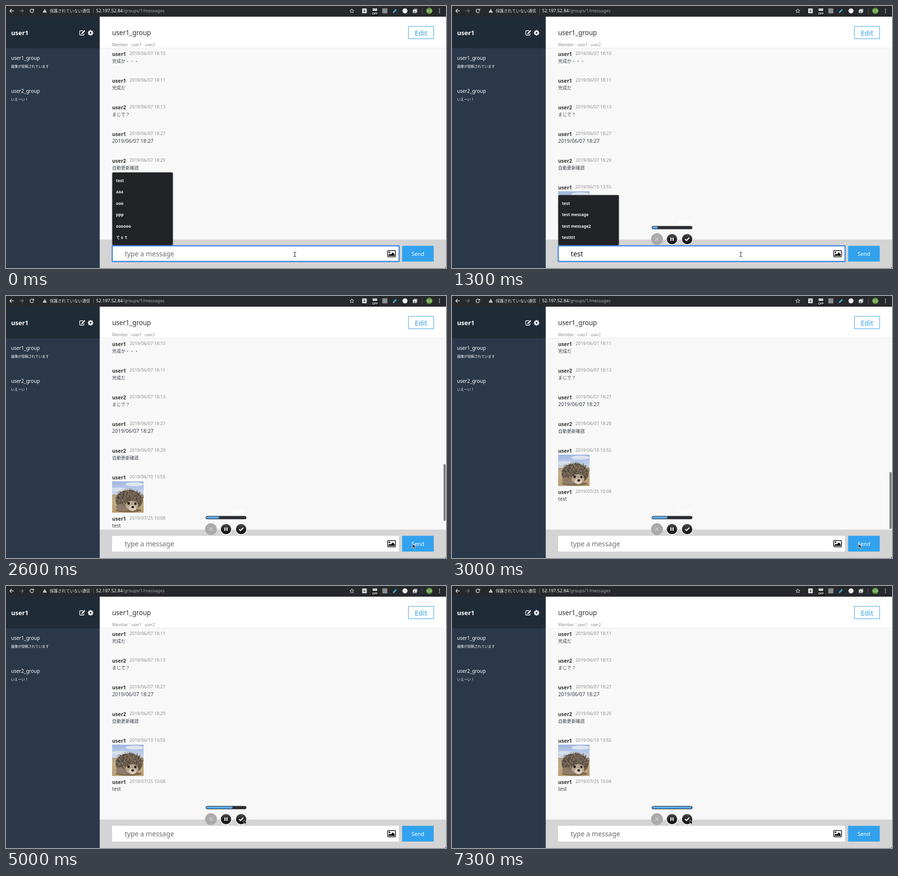
These frames come from a looping animation (908x540 px, 7400 ms). An HTML page with a canvas:

```html
<!DOCTYPE html>
<html lang="ja">
<head>
<meta charset="utf-8">
<title>Group chat</title>
<style>
html, body { margin: 0; width: 100%; height: 100%; overflow: hidden; background: #f8f8f8; }
canvas { display: block; width: 908px; height: 540px; }
</style>
</head>
<body>
<canvas id="stage" width="908" height="540"></canvas>
<script>
const c = document.getElementById('stage').getContext('2d');
const LOOP = 7400, STEP = 100;
const LATIN = '"Noto Sans", "Noto Sans CJK JP", sans-serif';
const JP = '"Noto Sans CJK JP", "Noto Sans", sans-serif';
const USERS = ['user1', 'user2'];

const messages = [
  { who: 0, date: '2019/06/07 18:10', body: '完成か・・・' },
  { who: 0, date: '2019/06/07 18:11', body: '完成だ' },
  { who: 1, date: '2019/06/07 18:13', body: 'まじで？' },
  { who: 0, date: '2019/06/07 18:27', body: '2019/06/07 18:27', latin: true },
  { who: 1, date: '2019/06/07 18:29', body: '自動更新確認' },
  { who: 0, date: '2019/06/10 13:55', photo: true },
  { who: 0, date: '2019/07/25 10:08', body: 'test', latin: true, sent: true }
];

// timeline, ms
const CONTROLS = 300, CLICK = 2500, POSTED = 2600, SCROLLED = 2900;
const keys = [[300, 't'], [500, 'te'], [600, 'tes'], [700, 'test']];
const suggestions = [
  [0, ['test', 'aaa', 'ooo', 'ppp', 'oooooo', 'てｓｔ']],
  [400, ['test', 'teeeeest', 'teeest', 'test message', 'test message2', 'testttt']],
  [700, ['test', 'test message', 'test message2', 'testttt']]
];
const pointerPath = [
  [0, 596, 512], [1300, 596, 512], [2100, 839, 511], [3600, 839, 511],
  [4100, 772, 486], [5000, 491, 482], [7400, 491, 482]
];

const clamp = v => Math.max(0, Math.min(1, v));
const ease = v => v * v * (3 - 2 * v);

function latest(list, t) {
  let value = null;
  for (const [start, v] of list) if (t >= start) value = v;
  return value;
}

function rect(x, y, w, h, color) {
  c.fillStyle = color;
  c.fillRect(x, y, w, h);
}

function round(x, y, w, h, r, fill, stroke, width = 1) {
  c.beginPath();
  c.roundRect(x, y, w, h, r);
  paint(fill, stroke, width);
}

function paint(fill, stroke, width = 1) {
  if (fill) { c.fillStyle = fill; c.fill(); }
  if (stroke) { c.strokeStyle = stroke; c.lineWidth = width; c.stroke(); }
}

function ellipse(x, y, rx, ry, fill, stroke, width) {
  c.beginPath();
  c.ellipse(x, y, rx, ry, 0, 0, Math.PI * 2);
  paint(fill, stroke, width);
}

function shape(points, fill, stroke, width, open) {
  c.beginPath();
  points.forEach(([x, y]) => c.lineTo(x, y));
  if (!open) c.closePath();
  paint(fill, stroke, width);
}

const line = (points, color, width) => shape(points, null, color, width, true);

function text(s, x, y, size, color, { weight = 400, font = LATIN, align = 'left' } = {}) {
  c.font = `${weight} ${size}px ${font}`;
  c.textAlign = align;
  c.fillStyle = color;
  c.fillText(s, x, y);
}

function browserBar() {
  const light = '#e9e9ea';
  rect(0, 0, 908, 22, '#27282c');
  line([[16, 10], [8, 10]], light, 1.3);
  line([[11.5, 6.3], [8, 10], [11.5, 13.7]], light, 1.3);
  line([[28, 10], [36, 10]], '#77787b', 1.2);
  line([[32.5, 6.3], [36, 10], [32.5, 13.7]], '#77787b', 1.2);
  c.beginPath();
  c.arc(53.3, 10, 3.7, 0.3, Math.PI * 1.75);
  paint(null, light, 1.3);
  shape([[57.8, 5.5], [57.8, 9.2], [54, 9.2]], light);
  shape([[80, 6], [84.2, 13.5], [75.8, 13.5]], light);
  rect(79.6, 8.6, 0.9, 2.5, '#27282c');
  rect(79.6, 11.8, 0.9, 0.9, '#27282c');
  text('保護されていない通信', 90, 13.2, 8.4, '#e4e4e6', { font: JP });
  rect(180, 5, 1, 11, '#606166');
  text('52.197.52.84', 186, 13.3, 9.2, '#ffffff');
  text('/groups/1/messages', 241, 13.3, 8.9, '#a5a6aa');

  const star = [];
  for (let i = 0; i < 10; i++) {
    const a = i * Math.PI / 5 - Math.PI / 2, r = i % 2 ? 2 : 4.6;
    star.push([713.7 + Math.cos(a) * r, 10.3 + Math.sin(a) * r]);
  }
  shape(star, null, light, 0.9);
  round(735, 5, 9.5, 10, 1, '#d9dadb');
  line([[739.7, 7], [739.7, 12.5]], '#5d5f63', 1.2);
  shape([[737.3, 10], [742.1, 10], [739.7, 13]], '#5d5f63');
  rect(756.5, 5, 9.5, 6, '#c9cacc');
  round(754.5, 10.5, 13.5, 9, 1.5, '#050505');
  text('OFF', 761.2, 17.8, 6.3, '#ffffff', { weight: 600, align: 'center' });
  round(776.5, 4.7, 10.5, 10.5, 1, '#8b8c8f');
  line([[799.7, 13], [805.5, 7.2]], '#35a7c2', 3.2);
  line([[798.8, 14], [800, 12.8]], '#d8edf2', 1.2);
  ellipse(823.4, 10, 5.2, 5.2, '#eeeeee');
  round(841.5, 5.5, 7.5, 7, 1, '#8d8e92');
  round(839.5, 7.5, 8, 7, 1, '#e2e2e3');
  shape([[840.5, 13.5], [843, 10.2], [846.3, 13.5]], '#77787b');
  rect(858.5, 4, 1, 12, '#55565a');
  ellipse(873.5, 10, 6.5, 6.5, '#5d963b');
  text('会員', 873.5, 12.3, 5.5, '#dceacf', { font: JP, align: 'center' });
  for (const y of [6.4, 10, 13.6]) ellipse(894.5, y, 1, 1, light);
}

function sidebar() {
  rect(0, 22, 193.4, 65, '#202b38');
  rect(0, 87, 193.4, 453, '#2a384a');
  text(USERS[0], 10.5, 60, 13, '#ffffff', { weight: 700 });

  c.beginPath();
  c.moveTo(159, 51);
  c.lineTo(153.5, 51);
  c.quadraticCurveTo(152, 51, 152, 52.5);
  c.lineTo(152, 58.5);
  c.quadraticCurveTo(152, 60, 153.5, 60);
  c.lineTo(159.5, 60);
  c.quadraticCurveTo(161, 60, 161, 58.5);
  c.lineTo(161, 56.5);
  paint(null, '#ffffff', 1.3);
  line([[156.8, 56.5], [162.6, 50.7]], '#ffffff', 2.5);
  shape([[155.2, 58], [155.8, 55.4], [157.8, 57.4]], '#ffffff');

  for (let i = 0; i < 4; i++) {
    const a = i * Math.PI / 4, dx = Math.cos(a) * 5.6, dy = Math.sin(a) * 5.6;
    line([[174.5 - dx, 55.3 - dy], [174.5 + dx, 55.3 + dy]], '#ffffff', 2.5);
  }
  ellipse(174.5, 55.3, 4.3, 4.3, '#ffffff');
  ellipse(174.5, 55.3, 1.8, 1.8, '#202b38');

  ['画像が投稿されています', 'いえーい！'].forEach((note, i) => {
    text(USERS[i] + '_group', 10.5, 111 + i * 68, 10, '#ffffff', { weight: 500 });
    text(note, 10.5, 126.5 + i * 68, 7.1, '#ffffff', { font: JP, weight: 500 });
  });
}

function header() {
  rect(193, 22, 715, 65, '#ffffff');
  rect(193, 86, 715, 1, '#ececec');
  text(USERS[0] + '_group', 219, 60, 13.5, '#2c2c2c');
  text('Member：', 219, 83, 8.2, '#8c8c8c');
  text(USERS[0], 259, 83, 8, '#8c8c8c');
  text(USERS[1], 286, 83, 8, '#8c8c8c');
  round(830.4, 42, 52.2, 25.5, 0, null, '#3a9fe0');
  text('Edit', 856.5, 60.5, 14.5, '#36a0e4', { align: 'center' });
}

function photo(x, y) {
  let seed = 7;
  const rnd = () => (seed = (seed * 16807) % 2147483647) / 2147483647;
  c.save();
  c.translate(x, y);
  c.beginPath();
  c.rect(0, 0, 65, 64.5);
  c.clip();
  const sky = c.createLinearGradient(0, 0, 0, 32);
  sky.addColorStop(0, '#9fb6e0');
  sky.addColorStop(0.6, '#c0cfe8');
  sky.addColorStop(1, '#dbe0e6');
  rect(0, 0, 65, 32, sky);
  ellipse(46, 6, 19, 4, '#dfe5f1');
  ellipse(14, 17, 18, 4, '#d8dfec');
  const sand = c.createLinearGradient(0, 26, 0, 65);
  sand.addColorStop(0, '#a89f84');
  sand.addColorStop(0.35, '#c4ae86');
  sand.addColorStop(1, '#b69b70');
  rect(0, 27, 65, 38, sand);
  ellipse(34, 60, 27, 4, '#806c51');
  ellipse(35, 39, 28, 21, '#66584a');
  ellipse(24, 53, 16, 8, '#8f7c68');
  for (let i = 0; i < 330; i++) {
    const a = rnd() * Math.PI * 2, r = Math.sqrt(rnd());
    const px = 35 + Math.cos(a) * r * 28, py = 35 + Math.sin(a) * r * 18;
    line([[px, py], [px + (px - 38) * 0.08, py - 2.5]], i % 2 ? '#3d3229' : '#a3937f', 0.8);
  }
  ellipse(41, 50, 13, 10, '#b8a48e');
  ellipse(42, 55, 8, 6, '#dccdbb');
  ellipse(34, 45.5, 2.5, 2.8, '#1d1815');
  ellipse(48, 46, 2.3, 2.6, '#1d1815');
  ellipse(42.5, 53, 3, 2.5, '#2b211e');
  c.restore();
}

function messageList(t) {
  const scroll = 55 * ease(clamp((t - POSTED) / (SCROLLED - POSTED)));
  c.save();
  c.beginPath();
  c.rect(193, 87, 715, 394.5);
  c.clip();
  let y = 99 - scroll;
  for (const m of messages) {
    if (!m.sent || t >= POSTED) {
      text(USERS[m.who], 219, y + 4, 10.4, '#333333', { weight: 700 });
      text(m.date, 255, y + 1.5, 9.1, '#8f8f8f');
      if (m.photo) photo(219, y + 8);
      else if (m.latin) text(m.body, 219, y + 18, m.sent ? 10.2 : 10.5, '#3b414a');
      else text(m.body, 219, y + 17.5, 9.15, '#3b414a', { font: JP });
    }
    y += m.photo ? 85 : 55;
  }
  c.restore();
  if (t >= POSTED) {
    c.globalAlpha = 1 - clamp((t - 3500) / 300);
    round(902.8, 363 - (55 - scroll) * 0.3, 4.6, 117, 2.3, '#7e7e7e');
    c.globalAlpha = 1;
  }
}

function form(t) {
  const focused = t < CLICK, typed = latest(keys, t);
  rect(193, 481.5, 715, 58.5, '#d4d4d4');
  rect(219, 494.3, 592, 32.4, '#ffffff');
  if (focused) round(219.2, 494.2, 592, 32.4, 1, null, '#4a8be6', 2.6);
  if (typed && t < POSTED) {
    text(typed, 245, 516, 14.4, '#111111');
    const sinceKey = t - 700;
    if (focused && (sinceKey < 0 || sinceKey % 1000 < 500)) {
      rect(245 + c.measureText(typed).width, 503, 1, 15, '#111111');
    }
  } else {
    text('type a message', 245, 516, 13.9, '#6c6c6c');
  }
  round(787.7, 504, 16, 13, 1.5, null, '#111111', 1.5);
  ellipse(791.5, 507.7, 1.6, 1.6, '#111111');
  shape([[789.5, 515], [789.5, 513], [792, 510.5], [794, 512.3],
    [798.2, 507.7], [802, 511.5], [802, 515]], '#111111');
  rect(817.4, 494.3, 65.3, 32.4, '#32a2ee');
  text('Send', 850, 514.7, 11.2, '#ffffff', { align: 'center' });
}

function dropdown(t) {
  if (t >= CLICK) return;
  const items = latest(suggestions, t), step = 23.4;
  const h = items.length * step + 9.6, top = 493 - h;
  c.save();
  c.shadowColor = 'rgba(0,0,0,.3)';
  c.shadowBlur = 3;
  round(219.3, top, 125, h, 2, '#222327');
  c.restore();
  items.forEach((s, i) => text(s, 227, top + 20 + i * step, 8.3, '#eeeeee', { weight: 600 }));
}

function recorder(t) {
  if (t < CONTROLS) return;
  rect(467, 440, 29, 9, 'rgba(255,255,255,.45)');
  round(412.3, 453.8, 83.6, 6, 3, '#2f3035');
  const end = 494 - (7300 - t) * 0.0116;
  const blue = c.createLinearGradient(0, 454, 0, 460);
  blue.addColorStop(0, '#7cc4fb');
  blue.addColorStop(1, '#2f8fe6');
  c.save();
  c.beginPath();
  c.roundRect(412.8, 454.2, 82.6, 5.2, 2.6);
  c.clip();
  rect(412.8, 454, Math.max(0, end - 412.8), 6, blue);
  c.restore();
  round(412.6, 454, 83, 5.6, 2.8, null, '#202227', 0.9);

  ellipse(423, 480.5, 12, 12, '#aaaaaa', '#b6b6b6', 1);
  line([[419.5, 477], [426.5, 484]], '#c2c2c2', 2.5);
  line([[426.5, 477], [419.5, 484]], '#c2c2c2', 2.5);
  for (const x of [454, 485.3]) {
    const dark = c.createLinearGradient(0, 469, 0, 492);
    dark.addColorStop(0, '#505050');
    dark.addColorStop(0.55, '#202020');
    dark.addColorStop(1, '#101010');
    ellipse(x, 480.5, 11.3, 11.3, dark, '#f5f5f5', 1.4);
  }
  rect(450.8, 477, 2.2, 7, '#ffffff');
  rect(455, 477, 2.2, 7, '#ffffff');
  line([[481, 480.5], [484, 483.3], [489.6, 477.5]], '#ffffff', 2.3);
}

function pointer(t) {
  if (t >= CONTROLS && t < 1300) return;
  const i = pointerPath.findIndex(p => p[0] > t);
  const [t0, x0, y0] = pointerPath[i - 1], [t1, x1, y1] = pointerPath[i];
  const linear = (t - t0) / (t1 - t0);
  // the exit move speeds up through its middle point
  const k = t0 === 3600 ? linear * linear : t0 === 4100 ? 1 - (1 - linear) ** 2 : ease(linear);
  const x = x0 + (x1 - x0) * k, y = y0 + (y1 - y0) * k;
  if (x < 811 && y > 494) {
    line([[x - 2.5, y - 5], [x, y - 4], [x + 2.5, y - 5]], '#222222', 1);
    line([[x, y - 4], [x, y + 4]], '#222222', 1.1);
    line([[x - 2.5, y + 5], [x, y + 4], [x + 2.5, y + 5]], '#222222', 1);
  } else {
    const tip = [[0, 0], [0, 8.6], [2, 6.8], [3.4, 10], [5, 9.3], [3.6, 6.3], [6.2, 6.1]];
    shape(tip.map(([a, b]) => [x + a, y + b]), '#000000', '#ffffff', 0.7);
  }
}

function windowCorners() {
  const r = 3;
  c.beginPath();
  c.rect(0, 0, 908, 540);
  c.roundRect(0, 0, 908, 540, [0, 0, r, r]);
  c.fillStyle = '#111111';
  c.fill('evenodd');
}

function draw(now) {
  const t = Math.floor((now % LOOP) / STEP) * STEP;
  rect(0, 0, 908, 540, '#f8f8f8');
  messageList(t);
  header();
  form(t);
  sidebar();
  browserBar();
  dropdown(t);
  recorder(t);
  pointer(t);
  windowCorners();
}

const start = performance.now();
function tick() {
  draw(performance.now() - start);
  requestAnimationFrame(tick);
}
tick();
</script>
</body>
</html>
```
